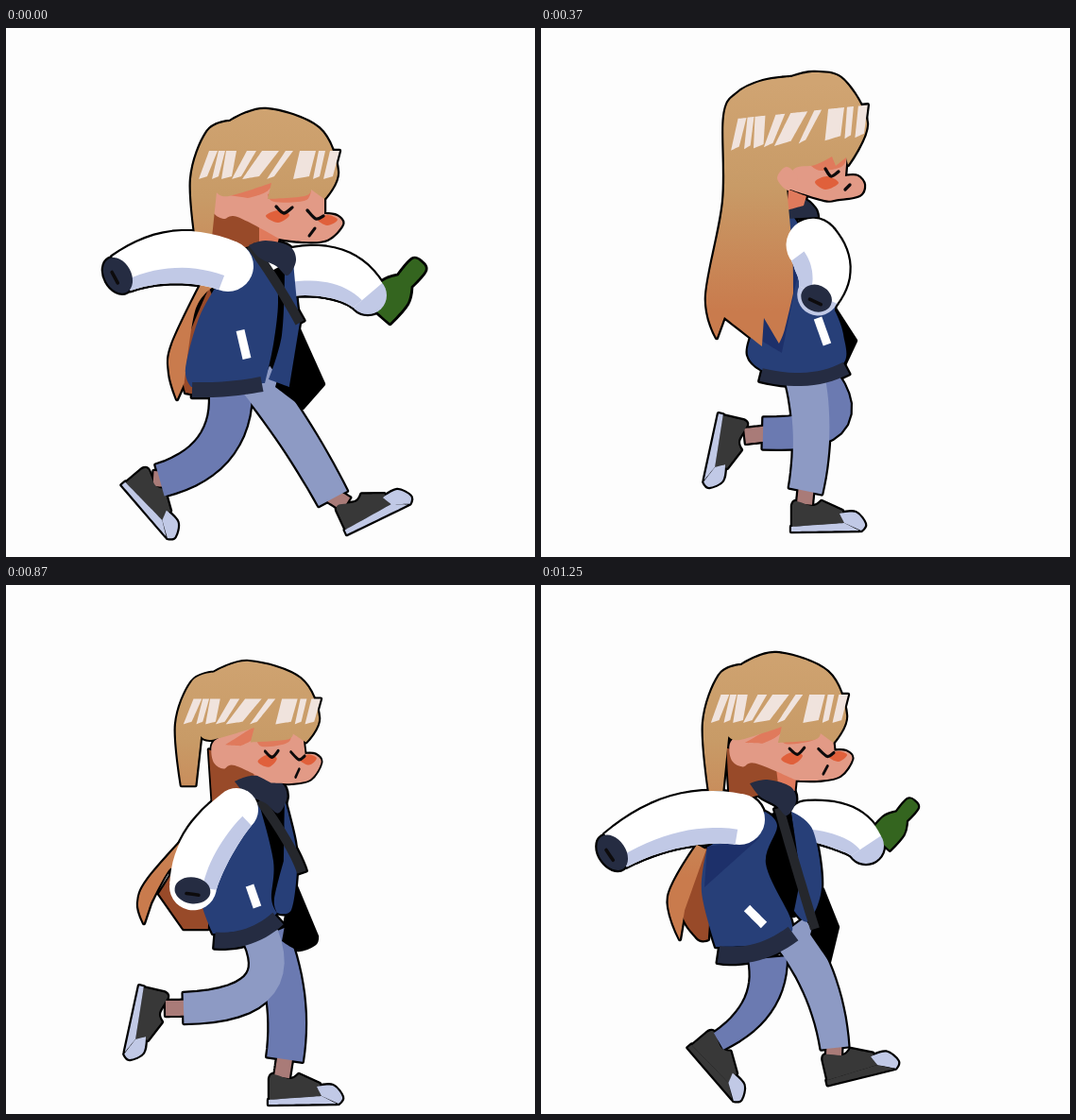
Write an HTML page that moves like this. It is 560 by 560 pixels and loops after 1.37 s.

```html
<!DOCTYPE html>
<html lang="en">
<head>
<meta charset="utf-8">
<title>Tipsy walk</title>
<style>
html, body { margin: 0; width: 100%; height: 100%; overflow: hidden; background: #fdfdfd; }
svg { display: block; width: 100vw; height: 100vh; }
</style>
</head>
<body>
<svg id="stage" viewBox="0 0 560 560">
  <defs>
    <linearGradient id="hair" gradientUnits="userSpaceOnUse" x1="0" y1="70" x2="0" y2="310">
      <stop offset="0" stop-color="#d0a472"/>
      <stop offset=".45" stop-color="#c89b67"/>
      <stop offset="1" stop-color="#c97b4d"/>
    </linearGradient>
  </defs>
</svg>
<script>
const hair = 'url(#hair)', darkHair = '#984a29', skin = '#e29a86', blush = '#e0603b',
  warm = '#e07a5c', gloss = '#f0e3dd', blue = '#273f78', deepBlue = '#1d306a', navy = '#252c42',
  white = '#fff', lilac = '#c1c9e6', black = '#000', nearJean = '#8d9ac4', farJean = '#6b7ab1',
  ankle = '#a97b78', green = '#34651f', grey = '#383838';

// Catmull-Rom curve through "x,y" points; "!" marks a corner.
function curve(text, closed = true) {
  const pts = text.split(' ').map(s => ({ p: s.split(',').map(parseFloat), hard: s.endsWith('!') }));
  const n = pts.length;
  const at = i => closed ? pts[(i + n) % n] : pts[Math.max(0, Math.min(n - 1, i))];
  const handle = (i, dir) => at(i).p.map((v, k) =>
    at(i).hard ? v : (v + dir * (at(i + 1).p[k] - at(i - 1).p[k]) / 6).toFixed(1));
  let d = 'M' + pts[0].p;
  for (let i = 0; i < (closed ? n : n - 1); i++)
    d += `C${handle(i, 1)} ${handle(i + 1, -1)} ${at(i + 1).p}`;
  return d + (closed ? 'Z' : '');
}

const shape = (fill, text) => text ? `<path d="${curve(text)}" fill="${fill}"/>` : '';
const disc = (fill, x, y, r) => `<circle cx="${x}" cy="${y}" r="${r}" fill="${fill}"/>`;
const ink = (text, w = 3.3) => text
  ? `<path d="${curve(text, false)}" fill="none" stroke="#0d0b0c" stroke-width="${w}" stroke-linecap="round"/>` : '';
const place = (art, [x, y, turn = 0, sx = 1, sy = sx], px = 0, py = 0) =>
  `<g transform="translate(${x} ${y}) rotate(${turn}) scale(${sx} ${sy}) translate(${-px} ${-py})">${art}</g>`;

// Point, unit direction and width along a bent limb.
function along([x0, y0, cx, cy, x1, y1, w0, w1 = w0], t, bulge = 0) {
  const u = 1 - t;
  const dx = u * (cx - x0) + t * (x1 - cx), dy = u * (cy - y0) + t * (y1 - cy);
  const len = Math.hypot(dx, dy);
  return {
    x: u * u * x0 + 2 * u * t * cx + t * t * x1,
    y: u * u * y0 + 2 * u * t * cy + t * t * y1,
    dx: dx / len, dy: dy / len,
    w: u * w0 + t * w1 + bulge * Math.sin(Math.PI * t)
  };
}

// Band of a limb between two fractions of its width; positive is the lower side.
function band(fill, limb, from = -.5, to = .5, bulge = 0) {
  const down = along(limb, .5).dx < 0 ? -1 : 1;
  const steps = Array.from({ length: 15 }, (_, i) => i / 14);
  const edge = f => steps.map(t => {
    const a = along(limb, t, bulge), k = f * a.w * down;
    return `${(a.x - a.dy * k).toFixed(1)} ${(a.y + a.dx * k).toFixed(1)}`;
  });
  return `<path d="M${[...edge(from), ...edge(to).reverse()].join('L')}Z" fill="${fill}"/>`;
}

const strip = (fill, [x0, y0, x1, y1], w) => band(fill, [x0, y0, (x0 + x1) / 2, (y0 + y1) / 2, x1, y1, w]);

function sleeve(limb, tip) {
  const [x, y, , , ex, ey, w0, w1] = limb;
  return disc(white, x, y, w0 / 2) + (tip ? disc(tip, ex, ey, w1 / 2) : '') +
    band(white, limb, -.5, .5, 7) + band(lilac, limb, .2, .5, 7);
}

function cuff(limb, inside) {
  const e = along(limb, 1), turn = Math.atan2(e.dy, e.dx) * 180 / Math.PI;
  const art = `<ellipse rx="14" ry="${e.w * (inside ? .38 : .49)}" fill="${navy}"/>` + ink('4,-7 4,6', 3.6);
  return place(art, [e.x + e.dx * 4, e.y + e.dy * 4, turn]);
}

function leg(fill, limb, foot, { shoe = grey, rim = lilac }) {
  const end = along(limb, .97);
  const art = shape(shoe, '-13,5! -9,0 9,5 18,0! 40,10! 42,23! -13,27!') +
    shape(rim, '-14,27! 42,23! 58,31! -14,32!') +
    shape(lilac, '42,23! 37,13! 54,12 64,24 60,31!');
  return strip(ankle, [end.x, end.y, foot[0], foot[1] + 3], 16) + place(art, foot) + band(fill, limb);
}

const bottle = shape(green, '-14,2! -14,-20 -7,-33! -7,-51 0,-54 7,-51 7,-33! 14,-20 14,2!');
const collar = shape(navy, '257,230! 275,225 300,231 307,246 298,262 286,252 268,243');

// Each strip of gloss: left foot, width, lean.
const shine = [[204, 9, 11], [218, 7, 7], [228, 11, 5], [239, 10, 16], [250, 18, 21],
  [276, 8, 20], [304, 17, 7], [325, 7, 6], [336, 10, 7]]
  .map(([x, w, lean]) => shape(gloss, `${x},160! ${x + lean},130! ${x + lean + w},130! ${x + w},157!`)).join('');

const cap = shape(hair, '202,232! 196,160 213,110 237,99! 275,86 331,106 351,152 337,181! 323,171! 316,178 277,181! 281,164! 236,178 223,174! 217,232!') + shine;
const nape = shape(darkHair, '214,180! 272,206! 275,228! 210,240!') +
  shape(warm, '268,208! 289,222! 286,234! 268,232!');
const face = shape(skin, '217,182 222,172 240,166! 280,155! 337,172! 337,197! 350,199 356,208 340,224 315,226 289,223! 245,200 230,202 219,195') +
  shape(warm, '236,177! 290,156! 276,173 256,180!') + shape(warm, '277,176! 323,164! 318,182 284,184') +
  shape(blush, '275,199 288,193 300,198 288,206') + shape(blush, '329,202 341,198 351,203 340,209') +
  ink('286,189 294,196 303,190') + ink('319,193 328,202 336,199') + ink('321,220 327,212', 3);

const profile = shape(warm, '262,182! 281,189! 278,199! 260,204!') +
  shape(skin, '264,160! 300,145! 324,145! 322,168! 335,168 342,177 337,188 315,192 300,193 264,182!') +
  shape(warm, '285,156! 308,145! 324,147! 318,158 296,162') +
  shape(blush, '290,174 303,168 315,175 301,182') + ink('301,160 307,168 315,163');
const ear = shape(skin, '250,170 260,158 272,170 262,183');

const strideBody = {
  bag: '305,308! 336,377! 314,402! 285,380!',
  under: '215,275! 187,345 190,386! 215,390! 225,300!',
  tail: '207,270! 176,335 173,365 181,393! 189,375! 200,300 218,275!',
  shirt: '280,258! 302,245! 302,310! 276,364!',
  coat: '258,232! 283,262 288,290 283,335 274,376! 196,380! 190,360 205,305 228,265!',
  flap: '295,258! 303,236! 308,290 311,312! 300,380! 278,372! 292,325',
  strap: [259, 230, 285, 265, 311, 312, 10],
  hem: [197, 383, 235, 384, 271, 377, 16],
  pocket: [248, 320, 255, 350],
  collar: [257, 230], face: [217, 188], cap: [275, 145]
};
const stride = {
  body: strideBody,
  bottle: [395, 299, 41, 1.25],
  farArm: [300, 259, 355, 250, 383, 283, 50, 40],
  arm: [235, 252, 178, 230, 122, 260, 54, 41],
  far: [238, 388, 238, 458, 163, 479, 44, 34], farFoot: [156, 474, 50],
  near: [262, 368, 310, 430, 346, 498, 40, 34], nearFoot: [360, 501, -25]
};

const pushBody = {
  bag: '305,318! 323,378! 318,392 298,402! 290,350!',
  under: '200,285! 183,360 195,389! 204,393! 215,290!',
  tail: '198,290! 169,355 175,389! 183,373! 195,310 207,285!',
  shirt: '284,250! 296,268! 289,316!',
  coat: '212,285! 230,250! 276,230! 288,262 289,330 279,368! 200,376! 192,355 208,305',
  fold: '213,300! 226,270! 258,270! 222,296',
  flap: '286,255! 297,240! 311,300 298,362 279,368! 288,310!',
  strap: [279, 238, 314, 285, 304, 333, 10],
  hem: [200, 380, 240, 366, 280, 377, 19],
  pocket: [243, 311, 253, 347],
  collar: [247, 209, 8], face: [216, 175, -7, 1.05], cap: [271, 123, -7, 1.05]
};
const push = {
  body: pushBody,
  bottle: [379, 270, 25],
  farArm: [302, 252, 345, 258, 364, 286, 64, 46],
  arm: [242, 244, 198, 235, 160, 278, 70, 37],
  far: [240, 382, 262, 432, 164, 437, 36, 33], farFoot: [147, 433, 95],
  near: [264, 378, 285, 430, 305, 494, 36, 32], nearFoot: [310, 506, -5]
};

const stepBody = {
  bag: '311,308! 333,342! 318,374!',
  coat: '260,200! 278,230 275,250 311,280! 311,310! 320,335 318,368 260,381 219,357 240,300!',
  fold: '260,203! 272,262 268,290 255,355! 230,340!',
  neckline: '261,193! 278,192 290,202 293,211! 260,213!',
  hem: [233, 378, 285, 391, 323, 371, 14],
  pocket: [293, 318, 303, 346],
  profile: [258, 170], shine: [270, 117, -6, 1, 1.1],
  mouth: '322,182 327,177',
  hair: '265,63! 290,58 320,66 345,112 325,156! 323,148! 312,157! 308,147! 290,156 268,160 260,180! 266,245 267,292! 258,330 252,345! 236,318! 234,348! 194,317! 186,339! 175,295 193,195 194,105 208,80 235,67'
};
const step = {
  body: stepBody, tip: lilac,
  bottle: [176, 240, -4],
  farArm: [200, 245, 195, 245, 187, 248, 54, 46],
  arm: [291, 237, 322, 240, 334, 268, 56, 44],
  far: [304, 380, 322, 420, 323, 484, 34, 30], farFoot: [322, 497, -10],
  near: [278, 385, 270, 440, 210, 475, 40, 32], nearFoot: [203, 484, 40]
};

const leapBody = {
  coat: '264,215! 278,215 290,265 312,275! 318,310 335,345 300,368 250,365 226,352! 255,300!',
  fold: '264,265! 312,278! 265,320 236,350!',
  neckline: '266,206! 290,214! 275,223! 266,225!',
  hem: [228, 366, 275, 380, 322, 366, 14],
  pocket: [304, 307, 313, 340],
  profile: [271, 190, -2, .79, 1], shine: [263, 132],
  hair: '266,80! 285,76 331,95 343,120 335,160 324,172! 322,158! 314,171! 303,161! 285,175 268,180 267,230 257,305 236,345! 226,310! 228,358! 199,341! 194,363! 179,325! 149,329! 187,250 186,170 196,102 215,84 245,78',
  wisp: '226,310! 236,348! 222,338'
};
const leap = {
  body: leapBody,
  bottle: [149, 285, -36, 1.45],
  wrist: [147, 261, 149, 280],
  farArm: [190, 253, 184, 253, 177, 256, 58, 54],
  arm: [301, 241, 334, 247, 379, 281, 56, 40],
  far: [296, 376, 328, 410, 358, 476, 44, 32], farFoot: [357, 488, -25],
  near: [256, 378, 250, 460, 170, 461, 43, 28], nearFoot: [152, 457, 100]
};

const passBody = {
  bag: '300,310! 325,370! 322,378 305,384 288,375!',
  under: '180,290! 158,325! 184,362! 210,362! 214,257! 195,258!',
  tail: '190,260! 146,310 136,335 142,356! 149,335! 170,298 177,315! 212,255!',
  shirt: '270,232! 292,228! 290,290 276,330!',
  coat: '212,255! 264,230! 279,290 277,330 283,345! 260,362 215,367! 202,330 206,285',
  fold: '212,256! 252,254! 226,285 204,310!',
  flap: '291,225! 302,270 304,300 298,342 283,345! 280,330 290,290!',
  strap: [265, 226, 300, 275, 309, 302, 10],
  hem: [217, 374, 255, 377, 284, 351, 17],
  pocket: [254, 316, 262, 339],
  collar: [238, 206, -2, 1.1], face: [214, 180, -7, .82, 1], cap: [253, 132, 0, .975, .9]
};
const pass = {
  body: passBody, tip: white, shoe: '#1b1b1c',
  bottle: [335, 240, 20],
  farArm: [300, 235, 315, 235, 322, 251, 44, 40],
  arm: [240, 236, 186, 225, 147, 245, 46, 50],
  far: [275, 400, 275, 450, 276, 503, 40], farFoot: [271, 514],
  near: [268, 365, 327, 437, 207, 429, 38, 33], nearFoot: [188, 428, 105]
};

const fallBody = {
  bag: '298,322! 314,362! 305,399! 285,370!',
  under: '175,278! 149,340 165,373 177,375! 182,300!',
  tail: '165,275! 135,330 147,375! 152,345! 175,280!',
  shirt: '240,245! 265,238! 275,310 271,347 258,348! 235,290',
  coat: '176,278! 237,240! 250,255 238,295 263,350 266,366! 240,380 185,383! 170,325',
  fold: '176,277! 232,267! 173,320!',
  flap: '265,240! 288,260 297,320 283,356 268,345! 275,310!',
  strap: [252, 236, 270, 300, 290, 364, 10],
  hem: [188, 391, 230, 397, 267, 369, 18],
  pocket: [218, 342, 236, 360],
  collar: [221, 210, 3], face: [200, 180, -7, .92, 1], cap: [249, 131, 0, .975, 1]
};
const fall = {
  body: fallBody, rim: grey,
  bottle: [360, 270, 41],
  farArm: [282, 250, 328, 252, 344, 276, 42, 38],
  arm: [210, 248, 144, 237, 79, 281, 54, 42],
  far: [240, 395, 245, 450, 188, 483, 40, 20], farFoot: [189, 480, 50],
  near: [262, 365, 303, 420, 311, 490, 42, 29], nearFoot: [310, 495, -13]
};

const rise = {
  ...step, bottle: null, farArm: null, lift: [0, -11], swing: 'rotate(48 285 235)',
  far: [292, 370, 345, 432, 235, 429, 40, 33], farFoot: [216, 429, 103],
  near: [280, 372, 292, 430, 280, 490, 42, 35], nearFoot: [279, 501]
};
const land = {
  ...pass, bottle: null, farArm: null, lift: [4, 2], swing: 'rotate(-55 240 236)', shoe: grey,
  far: [278, 370, 305, 435, 295, 502, 40, 38], farFoot: [292, 518],
  near: [270, 372, 300, 445, 188, 448, 38, 32], nearFoot: [169, 445, 103]
};

function head(b) {
  if (b.cap) return place(face, b.face, 217, 188) + place(cap, b.cap, 275, 145);
  return place(profile, b.profile, 258, 170) + ink(b.mouth) + shape(hair, b.hair) +
    shape(deepBlue, b.wisp) + place(shine, b.shine, 275, 145) + place(ear, b.profile, 258, 170);
}

function torso(b) {
  return shape(black, b.bag) + shape(darkHair, b.under) + shape(hair, b.tail) +
    (b.face ? place(nape, b.face, 217, 188) : '') +
    shape(black, b.shirt) + shape(blue, b.coat) + shape(deepBlue, b.fold) + shape(blue, b.flap) +
    (b.strap ? band('#25272c', b.strap) : '') +
    (b.collar ? place(collar, b.collar, 257, 230) : '') +
    shape(navy, b.neckline) + band(navy, b.hem) + strip(white, b.pocket, 9);
}

function figure(p) {
  const upper = torso(p.body) + head(p.body) +
    `<g transform="${p.swing || 'rotate(0)'}">${sleeve(p.arm, p.tip)}${cuff(p.arm, p.tip)}</g>`;
  return (p.bottle ? place(bottle, p.bottle) : '') +
    (p.wrist ? strip(navy, p.wrist, 11) : '') +
    (p.farArm ? sleeve(p.farArm, lilac) : '') +
    leg(farJean, p.far, p.farFoot, p) + leg(nearJean, p.near, p.nearFoot, p) +
    place(upper, p.lift || [0, 0]);
}

const cycle = [[stride, 0], [push, 250], [rise, 370], [step, 500],
  [leap, 750], [land, 870], [pass, 1000], [fall, 1250]];
const loop = 1370;
const stage = document.getElementById('stage');

// A black-edged copy below the fills leaves a line around the silhouette only.
const views = cycle.map(([pose]) => {
  const g = document.createElementNS('http://www.w3.org/2000/svg', 'g');
  const art = figure(pose);
  g.innerHTML = `<g stroke="#000" stroke-width="4.4" stroke-linejoin="round">${art}</g>${art}`;
  stage.append(g);
  return g;
});

function show(time) {
  const t = time % loop;
  const now = cycle.findLastIndex(([, start]) => t >= start);
  views.forEach((g, i) => { g.style.display = i === now ? '' : 'none'; });
}

const begin = performance.now();
function tick() {
  show(performance.now() - begin);
  requestAnimationFrame(tick);
}
show(0);
requestAnimationFrame(tick);
</script>
</body>
</html>
```
